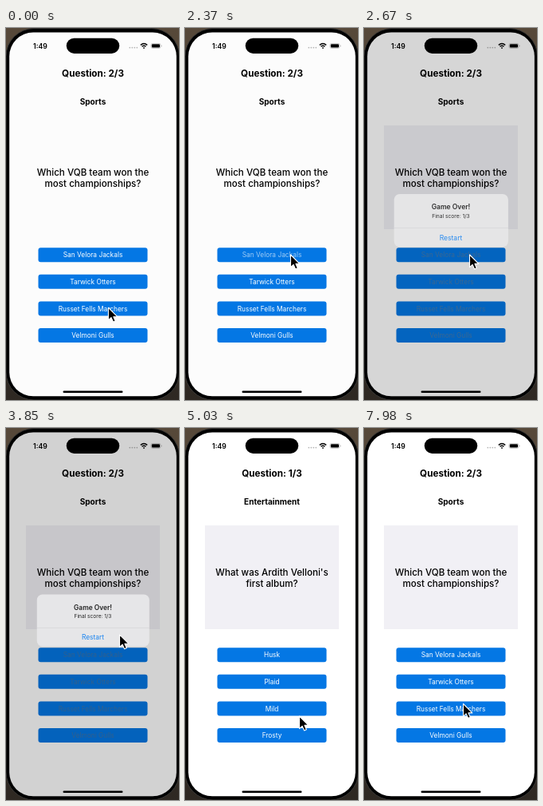
Animation, 217 px wide and 466 px high, one loop 8 s. Source, as an HTML page:

```html
<!DOCTYPE html>
<html lang="en">
<head>
<meta charset="utf-8">
<title>Quiz app</title>
<style>
  html, body { margin: 0; width: 100%; height: 100%; overflow: hidden; background: #000; }
  svg { display: block; width: 217px; height: 466px; }
  text { font-family: Inter, Roboto, sans-serif; text-anchor: middle; }
  .title { font-size: 11.7px; font-weight: 700; }
  .topic { font-size: 10.05px; font-weight: 700; }
  .question { font-size: 11.6px; font-weight: 500; }
  .answer { font-size: 8.35px; }
</style>
</head>
<body>
<svg viewBox="0 0 217 466">
  <defs>
    <linearGradient id="wall" x2="0" y2="1">
      <stop stop-color="#57493a"/><stop offset="1" stop-color="#2e2822"/>
    </linearGradient>
  </defs>
  <rect width="217" height="466" fill="url(#wall)"/>
  <rect x="0" y=".5" width="217.5" height="465.5" rx="35" stroke="#3a3937"/>
  <rect id="screen" x="4.2" y="5.4" width="209.6" height="455.9" rx="30"/>
  <rect id="card" x="25" y="122" width="168" height="130" fill="#f1f0f5"/>

  <text x="43" y="25.6" font-size="8.7" font-weight="600">1:49</text>
  <g fill="#b5b5b5">
    <circle cx="155.3" cy="24.6" r=".9"/><circle cx="158.3" cy="24.6" r=".9"/>
    <circle cx="161.3" cy="24.6" r=".9"/><circle cx="164.3" cy="24.6" r=".9"/>
  </g>
  <g fill="none" stroke="#000" stroke-width="1.4">
    <path d="M168.8 21.4Q173 17.8 177.2 21.4M170.5 23.3Q173 21.2 175.5 23.3"/>
    <circle cx="173" cy="25" r=".3"/>
  </g>
  <rect x="181.9" y="19.4" width="12" height="6" rx="1.9" fill="none" stroke="#aaa" stroke-width=".6"/>
  <rect x="182.8" y="20.3" width="10.2" height="4.2" rx="1.1"/>
  <rect x="194.6" y="21.4" width=".8" height="2" rx=".4" fill="#aaa"/>

  <text id="title" class="title" x="109" y="60.5"></text>
  <text id="topic" class="topic" x="109" y="96.4"></text>
  <text id="line0" class="question" x="109" y="184.5"></text>
  <text id="line1" class="question" x="109" y="199.3"></text>
  <g id="answers"></g>

  <rect id="dim" x="4.2" y="5.4" width="209.6" height="455.9" rx="30"/>
  <rect x="75.8" y="12.7" width="66.4" height="19.2" rx="9.6"/>
  <rect x="71.5" y="454.4" width="75" height="2.6" rx="1.3"/>

  <g id="alert">
    <rect id="alertBack" x="38.8" y="208.5" width="141" height="65.2" rx="7" fill="#e6e6e8"/>
    <g id="alertText">
      <path id="restartBack" d="M38.8 250.4h141v16.3a7 7 0 0 1-7 7h-127a7 7 0 0 1-7-7z" fill="#d2d2d5"/>
      <path d="M38.8 250.4h141" stroke="#cfcfd2" stroke-width=".6"/>
      <text x="109" y="227.6" font-size="8.4" font-weight="600" fill="#222">Game Over!</text>
      <text x="109" y="237.9" font-size="6.6" fill="#222">Final score: 1/3</text>
      <text x="109" y="265.3" font-size="8.4" fill="#1a84f0">Restart</text>
    </g>
  </g>
  <path id="cursor" d="M0 0V15.6L3.6 12.4 6.1 18 8.8 16.8 6.4 11.4H11.3Z" stroke="#fff" stroke-width="1.1" stroke-linejoin="round"/>
</svg>
<script>
const LOOP = 8000, STEP = 147.7;
const $ = id => document.getElementById(id);

const music = {
  title: 'Question: 1/3', topic: 'Entertainment',
  lines: ["What was Ardith Velloni's", 'first album?'],
  answers: ['Husk', 'Plaid', 'Mild', 'Frosty']
};
const sports = {
  title: 'Question: 2/3', topic: 'Sports',
  lines: ['Which VQB team won the', 'most championships?'],
  answers: ['San Velora Jackals', 'Tarwick Otters', 'Russet Fells Marchers', 'Velmoni Gulls']
};

// Keyframes: [step, value, ...]
const cursorPath = [
  [5, 128.4, 350.3], [12, 132.5, 284], [22, 132.5, 284], [26, 142.5, 258.8], [28, 142.5, 258.8],
  [30, 145, 326], [32, 145, 346], [34, 143.5, 361], [35, 140, 367.5], [38, 129.5, 348.5],
  [43, 129.5, 348.5], [47, 146, 336], [51, 137, 320.5], [54, 124.5, 345.5]
];
const alertLevel = [[16, 0], [17, .6], [18, .92], [19, 1], [27, 1], [28, .6], [29, .12], [30, 0]];

const labels = sports.answers.map((_, i) => {
  const y = 275.2 + i * 33.6;
  $('answers').insertAdjacentHTML('beforeend',
    `<rect x="40.5" y="${y}" width="137" height="18" rx="3" fill="#0477e4"/>
     <text class="answer" x="109" y="${y + 12.2}"></text>`);
  return $('answers').lastElementChild;
});

function sample(keys, step) {
  const next = keys.findIndex(key => key[0] > step);
  if (next === 0) return keys[0].slice(1);
  if (next < 0) return keys.at(-1).slice(1);
  const a = keys[next - 1], b = keys[next];
  const u = (step - a[0]) / (b[0] - a[0]), eased = u * u * (3 - 2 * u);
  return a.slice(1).map((v, i) => v + (b[i + 1] - v) * eased);
}

const mix = (from, to, u) => `rgb(${from.map((v, i) => v + (to[i] - v) * u)})`;

function draw(time) {
  const step = Math.floor(time % LOOP / STEP + .07);
  const page = step >= 28 && step < 40 ? music : sports;
  const pressed = step === 16 ? 0 : step === 39 ? 2 : -1;
  const [level] = sample(alertLevel, step);
  const [x, y] = sample(cursorPath, step);
  const soft = Math.sqrt(level);

  $('title').textContent = page.title;
  $('topic').textContent = page.topic;
  page.lines.forEach((line, i) => $('line' + i).textContent = line);
  labels.forEach((label, i) => {
    label.textContent = page.answers[i];
    label.setAttribute('fill', mix([255, 255, 255], [62, 116, 168], soft));
    label.setAttribute('opacity', i === pressed ? .62 : 1);
  });

  const cardShown = step >= 17;
  $('card').setAttribute('opacity', cardShown ? 1 : 0);
  $('screen').setAttribute('fill', cardShown ? '#fff' : '#fcfcfc');

  const scale = step < 22 ? 1 + .195 * (1 - level) : 1;
  $('dim').setAttribute('opacity', .175 * level);
  $('alert').setAttribute('transform', `translate(109.3 241) scale(${scale}) translate(-109.3 -241)`);
  $('alertBack').setAttribute('opacity', soft);
  $('alertText').setAttribute('opacity', level);
  $('restartBack').setAttribute('opacity', step === 27 ? 1 : 0);
  $('cursor').setAttribute('transform', `translate(${x} ${y})`);
}

const start = performance.now();
function tick() {
  draw(performance.now() - start);
  requestAnimationFrame(tick);
}
tick();
</script>
</body>
</html>
```
